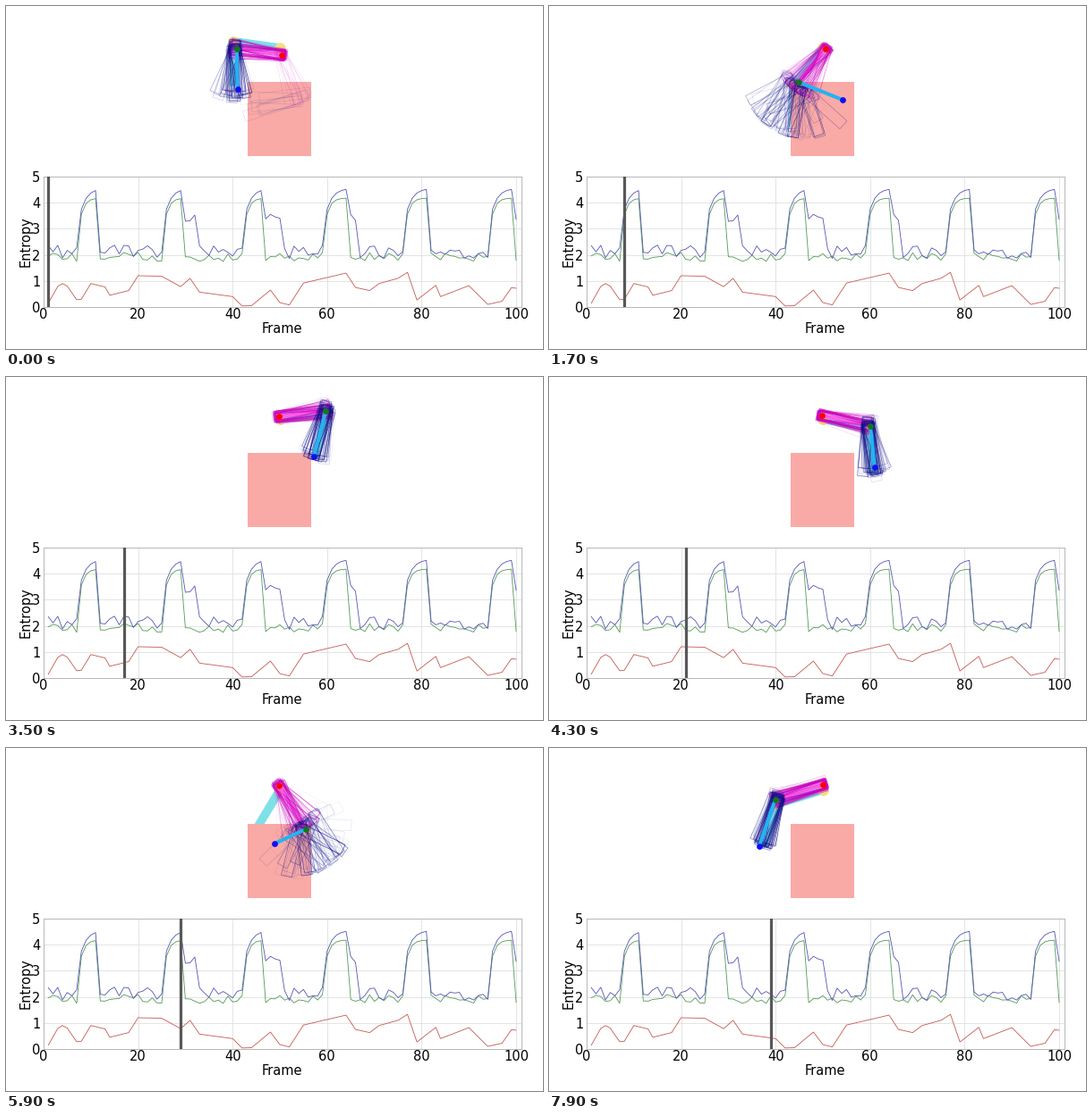
A matplotlib script for the animation above (8000 ms loop, 600 by 384 pixels).

```python
import numpy as np
import matplotlib.pyplot as plt
from matplotlib.animation import FuncAnimation
from matplotlib.collections import PolyCollection
from matplotlib.colors import to_rgba
from matplotlib.patches import Rectangle

W, H, DPI = 600, 384, 100
PX = 72 / DPI
STEP = 100
SAMPLES = 60

# First and last step with the arm behind the square, then steps of recovery
HIDDEN = [(8, 11, 0), (26, 29, 3), (43, 46, 4), (60, 64, 2), (77, 81, 0),
          (95, 99, 1)]


def track(*pairs):
    steps, values = zip(*pairs)
    return lambda n: np.interp(n, steps, values)


def entropy(seed, level, noise, peak, rise, rate, recovery):
    """Noisy rest level with a plateau for each hidden spell."""
    rng = np.random.default_rng(seed)
    y = level + noise * rng.uniform(-1, 1, 100)
    for first, last, tail in HIDDEN:
        k = np.arange(last - first + 1)
        y[first - 1:last] = peak - rise * np.exp(-rate * k)
        if recovery:
            y[last:last + tail] = recovery + rng.uniform(-0.2, 0.2, tail)
    return y


xs = np.arange(1, 101)
blue = entropy(4, 2.11, 0.27, 4.55, 0.8, 0.75, 3.45)
green = entropy(7, 1.92, 0.17, 4.18, 0.62, 1.1, None)
red = track((1, .15), (3.5, .95), (5, .8), (7.5, .15), (10, .9), (13, .77),
            (14, .45), (18, .63), (20, 1.2), (25, 1.18), (29, .78), (31, 1.1),
            (33, .57), (40, .4), (42, .04), (44, .05), (48, .65), (50, .17),
            (52, .08), (55, .92), (64, 1.3), (66, .75), (69, .63), (71, .9),
            (75, 1.1), (77, 1.33), (79, .27), (83, .83), (84, .4), (90, .82),
            (94, .1), (97, .22), (99, .74), (100, .72))(xs)

# Angles are in degrees from straight down, positive to the right.
upper = track((1, -98), (5, -86), (8, -39), (13, 61), (17, 97), (21, 78),
              (26, 31), (29, -31), (34, -69), (37, -80), (39, -73))
lower = track((1, 1), (4, -10), (8, 68), (13, 1), (16, -20), (21, 6),
              (26, -65), (31, -20), (34, 16), (39, -19))
upper_len = track((1, 50.6), (8, 47.6), (21, 55), (29, 57), (34, 51), (39, 55))
lower_len = track((1, 45), (8, 53), (13, 58), (21, 47), (29, 38.5), (34, 46),
                  (39, 55))
base_x = track((1, 308), (8, 309), (13, 305), (39, 305.5))


def heading(deg):
    a = np.radians(deg)
    return np.array([np.sin(a), np.cos(a)])


def box(p, deg, length, half, over=4):
    d = heading(deg)
    side = half * np.array([-d[1], d[0]])
    a, b = p - over * d, p + (length + over) * d
    return [a + side, b + side, b - side, a - side]


def step_at(i):
    t = i * STEP
    return 1 if t < 500 else 2 + (t - 500) // 200


def last_seen(n):
    """The step whose pose the estimate holds, and whether the arm is hidden."""
    for first, last, _ in HIDDEN:
        if first <= n <= last:
            return first, True
    return n, False


fig = plt.figure(figsize=(W / DPI, H / DPI), dpi=DPI, facecolor="white")

# Chart
chart = fig.add_axes([42 / W, 1 - 337 / H, 534 / W, 146 / H])
chart.set(xlim=(0, 534 / 5.28), ylim=(0, 5),
          xticks=range(0, 101, 20), yticks=range(6))
chart.set_axisbelow(True)
chart.grid(color="#dedede", lw=0.8 * PX)
for spine in chart.spines.values():
    spine.set(color="#b8b8b8", lw=PX)
FONT = {"family": "DejaVu Sans", "size": 14.6 * PX}
chart.tick_params(axis="x", length=0, pad=0.9)
chart.tick_params(axis="y", length=0, pad=2.6)
for label in chart.get_xticklabels() + chart.get_yticklabels():
    label.set(**FONT)
fig.text(308.5 / W, 1 - 365.5 / H, "Frame", ha="center", va="baseline", **FONT)
fig.text(30 / W, 1 - 264 / H, "Entropy", rotation=90, ha="right",
         va="center", **FONT)

for data, color in ((red, "#c65a55"), (green, "#559a58"), (blue, "#5656b8")):
    chart.plot(xs, data, color=color, lw=0.85 * PX)
cursor = chart.axvline(1, color="#585858", lw=3.2 * PX, zorder=5)

# Arm scene, in pixels with y pointing down
scene = fig.add_axes([0, 0, 1, 1], facecolor="none")
scene.set(xlim=(0, W), ylim=(H, 0))
scene.axis("off")


def link(color, width, z):
    return scene.plot([], [], color=color, lw=width * PX, zorder=z,
                      solid_capstyle="butt")[0]


def dot(color, radius, z):
    return scene.plot([], [], "o", color=color, ms=2 * radius * PX, mew=0,
                      zorder=z)[0]


true_links = [link("#7fe0e8", 9.5, 1) for _ in range(2)]
true_dots = [dot("#f2de86", 6.3, 2) for _ in range(2)]
scene.add_patch(Rectangle((270, 85), 71, 83, color="#f9aaa6", lw=0, zorder=3))
est_upper = link("#ff62ee", 4.5, 4)
est_lower = link("#22b4f4", 4, 6)
est_dots = [dot(c, 3.4, 7) for c in ("#ff0000", "#0c7a1c", "#1010f0")]
boxes = PolyCollection([], facecolors="none", linewidths=0.7 * PX, zorder=5)
scene.add_collection(boxes, autolim=False)


def span(line, a, b):
    line.set_data([a[0], b[0]], [a[1], b[1]])


def place(marker, p):
    marker.set_data([p[0]], [p[1]])


def sample_boxes(n, base, a_upper, a_lower):
    """Outlines of the sampled arms; they fan out as entropy grows."""
    rng = np.random.default_rng(100 + n)
    k = np.clip((blue[n - 1] - 2) / 2.4, 0, 1)
    a1 = rng.normal(a_upper, 2.5 + 9 * k, SAMPLES)
    a2 = rng.normal(a_lower, 4 + 28 * k, SAMPLES)
    alpha = np.clip(rng.exponential(0.2, SAMPLES), 0.06, 0.8)
    # a few lost samples linger at the start
    lost = int(7 * np.exp(1 - n))
    a1[:lost] = rng.uniform(10, 45, lost)
    a2[:lost] = rng.uniform(-95, -72, lost)
    alpha[:lost] = 0.13

    uppers, lowers = [], []
    for u, v in zip(a1, a2):
        p = base + rng.normal(0, 1.3, 2)
        uppers.append(box(p, u, 53, 5))
        lowers.append(box(p + 53 * heading(u), v, 49, 6))
    colors = [to_rgba(c, a) for c in ("#cc00c0", "#10108c") for a in alpha]
    return uppers + lowers, colors


def draw(i):
    n = step_at(i)
    seen, hidden = last_seen(n)
    cursor.set_xdata([n, n])

    base = np.array([base_x(n), 41 + 15 * np.exp(-n / 11)])
    elbow = base + upper_len(n) * heading(upper(seen))
    tip = elbow + lower_len(n) * heading(lower(seen))
    span(est_upper, base, elbow)
    span(est_lower, elbow, tip)
    for marker, p in zip(est_dots, (base, elbow, tip)):
        place(marker, p)

    pivot = np.array([306.0, 47.0])
    joint = pivot + 53 * heading(upper(n))
    hang = 0 if hidden else lower(n)
    span(true_links[0], pivot, joint)
    span(true_links[1], joint, joint + 50 * heading(hang))
    place(true_dots[0], pivot)
    place(true_dots[1], joint)

    mean_lower = lower(seen) * (-0.3 if hidden else 1)
    verts, colors = sample_boxes(n, base, upper(seen), mean_lower)
    boxes.set_verts(verts)
    boxes.set_edgecolor(colors)
    return []


anim = FuncAnimation(fig, draw, frames=8000 // STEP, interval=STEP,
                     init_func=lambda: draw(0), repeat=True, repeat_delay=0)
plt.show()
```
